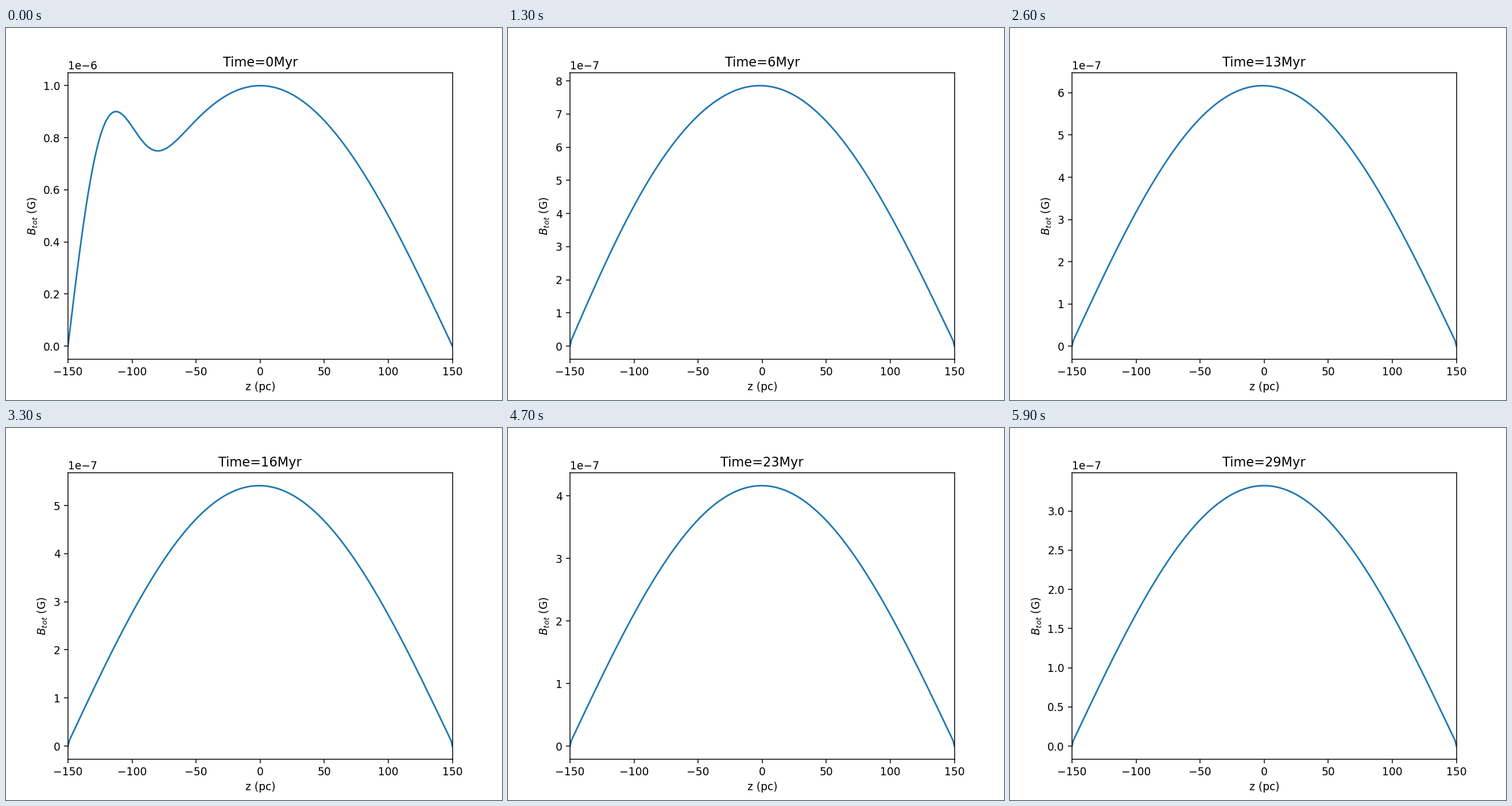
Recreate the animation shown at these times as a matplotlib script. Size 864x648 px, loop 6000 ms.

```python
import numpy as np
import matplotlib.pyplot as plt
from matplotlib.animation import FuncAnimation

FRAMES = 60
INTERVAL = 100       # ms
MYR_PER_FRAME = 0.5
HALF = 150           # half thickness of the layer, pc
WALL = 151           # the field vanishes one cell outside the layer
RATE = 0.0375        # decay rate of the slowest mode, 1/Myr

z = np.linspace(-HALF, HALF, 2 * HALF + 1)
fine = np.linspace(-WALL, WALL, 3021)
modes = np.arange(1, 41)


def start_fields(x):
    """Both field components at time zero, in gauss."""
    base = 1e-6 * np.maximum(np.cos(np.pi * x / (2 * HALF)), 0)
    bump = 3.802 * np.exp(-(x + HALF) ** 2 / 2427)
    return np.array([base, base * bump])


def basis(x):
    return np.sin(np.outer(modes, np.pi * (x + WALL) / (2 * WALL)))


# Sine-mode amplitudes of each component
coeffs = start_fields(fine) @ basis(fine).T * (fine[1] - fine[0]) / WALL
shapes = basis(z)


def total_field(t):
    if t == 0:
        parts = start_fields(z)
    else:
        parts = (coeffs * np.exp(-RATE * modes ** 2 * t)) @ shapes
    total = np.hypot(*parts)
    total[[0, -1]] = 0
    return total


fig, ax = plt.subplots(figsize=(6.4, 4.8), dpi=135)
line, = ax.plot(z, total_field(0), color="C0")
ax.set_xlim(-HALF, HALF)
ax.set_xlabel("z (pc)")
ax.set_ylabel("$B_{tot}$ (G)")
title = ax.set_title("Time=0Myr")


def update(frame):
    t = frame * MYR_PER_FRAME
    field = total_field(t)
    top = field.max()
    line.set_ydata(field)
    ax.set_ylim(-0.05 * top, 1.05 * top)
    title.set_text(f"Time={int(t)}Myr")
    return line, title


anim = FuncAnimation(fig, update, frames=FRAMES, interval=INTERVAL,
                     repeat=True, repeat_delay=0, blit=False)
plt.show()
```
